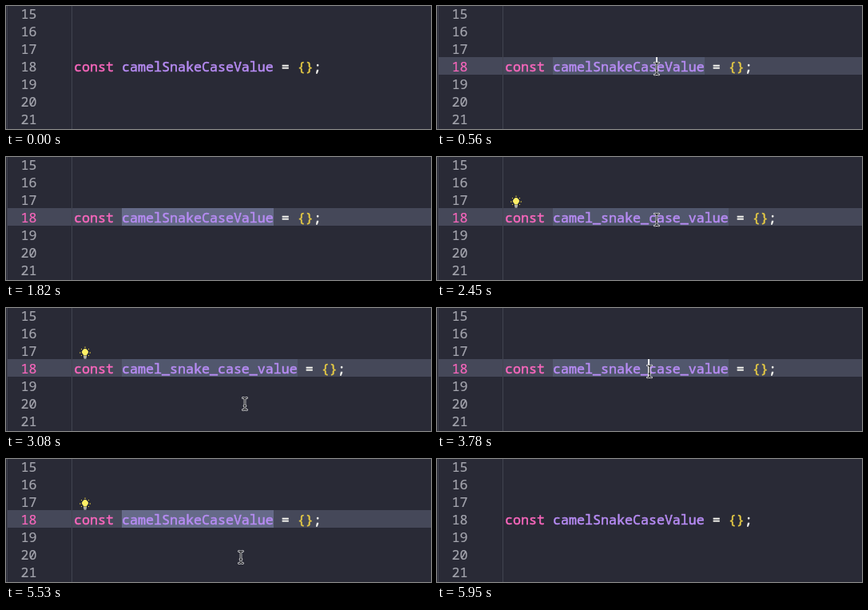
Animation, 532 px wide and 154 px high, one loop 7000 ms. Source, as an HTML page:

```html
<!DOCTYPE html>
<html lang="en">
<head>
<meta charset="utf-8">
<title>Change case</title>
<style>
  html, body { margin: 0; width: 100%; height: 100%; overflow: hidden; background: #292a36; }
  svg { display: block; width: 532px; height: 154px; }
  text { font: 16.667px "Noto Sans Mono", "DejaVu Sans Mono", monospace; white-space: pre; }
  .num, .key, .name, .op, .brace { fill: currentColor; stroke: currentColor; stroke-width: .5; }
  .num { color: #a5a6af; stroke-width: .2; }
  .num.active, .key { color: #f967bd; }
  .name { color: #b88cf5; }
  .op { color: #f8f8f2; }
  .brace { color: #e6cb45; }
</style>
</head>
<body>
<svg viewBox="0 0 532 154">
  <rect width="532" height="154" fill="#292a36"/>
  <rect id="line" x="2" y="64" width="530" height="22" fill="#454859"/>
  <rect id="word" x="145" y="64" height="22"/>
  <rect x="1" width="1" height="154" fill="#41434f"/>
  <rect x="82" width="1" height="154" fill="#41434f"/>
  <g id="nums"></g>
  <text x="85" y="82"><tspan class="key">const </tspan><tspan class="name" id="name"></tspan><tspan class="op"> = </tspan><tspan class="brace">{}</tspan><tspan class="op">;</tspan></text>
  <rect id="caret" y="64" width="2" height="22" fill="#f8f8f2"/>
  <g id="bulb" transform="translate(99 56)">
    <path d="M0-7.500v1.500M-5-5l1 1M5-5l-1 1M-7 0h1.500M7 0h-1.500M-5 4l1-1M5 4l-1-1" stroke="#f5d93f"/>
    <path d="M-2 3.500Q-2 2.500-2.700 1.800A3.800 3.800 0 1 1 2.700 1.800Q2 2.500 2 3.500Z" fill="#fff066"/>
    <path d="M-2 5h4M-1.500 6.800h3" stroke="#dcdccb" stroke-width="1.300"/>
  </g>
  <g id="mouse" fill="none" stroke-linecap="round">
    <path id="edge" stroke="#fff" stroke-width="2.6"/>
    <path id="core" stroke="#101116" stroke-width="1.2"/>
  </g>
</svg>
<script>
const LOOP = 7000, STEP = 70, CHAR = 10;
const $ = id => document.getElementById(id);
const show = (id, on) => $(id).setAttribute('visibility', on ? 'visible' : 'hidden');
const within = (t, a, b) => t >= a && t < b;

const beam = 'M-2.500-7.500Q0-7.500 0-6V6Q0 7.500-2.500 7.500M2.500-7.500Q0-7.500 0-6M0 6Q0 7.500 2.500 7.500M-1 2.500H1';
$('edge').setAttribute('d', beam);
$('core').setAttribute('d', beam);

$('nums').innerHTML = Array.from({ length: 7 }, (_, i) =>
  `<text class="num" id="n${15 + i}" x="18.5" y="${16 + 22 * i}">${15 + i}</text>`).join('');

// Pointer moves: start, end, hidden at, from, to
const moves = [
  [70, 350, 1820, [378, 129], [275, 78.5]],
  [2450, 2870, 3080, [275, 78.5], [299, 120]],
  [3080, 3500, 4690, [299, 120], [266, 79.5]],
  [5530, 5531, 5600, [294, 123], [294, 123]]
];

function pointer(t) {
  const move = moves.find(m => within(t, m[0], m[2]));
  if (!move) return null;
  const [start, end, , from, to] = move;
  const p = Math.min(1, (t - start) / (end - start));
  const e = p * p * (3 - 2 * p);
  return from.map((v, i) => v + (to[i] - v) * e);
}

function caretX(t, end) {
  if (within(t, 560, 840)) return 274;
  if (within(t, 3570, 3850)) return 264;
  if (within(t, 1890, 2450) || within(t, 3850, 4410)) return end - 1;
  return null;
}

function draw(time) {
  const t = Math.floor((time % LOOP) / STEP) * STEP;
  const name = within(t, 1890, 4760) ? 'camel_snake_case_value' : 'camelSnakeCaseValue';
  const width = name.length * CHAR;
  const focused = within(t, 560, 5950);
  const selected = within(t, 840, 2450) || within(t, 3850, 5950);

  $('name').textContent = name;
  $('word').setAttribute('width', width);
  $('word').setAttribute('fill', selected ? '#656a88' : '#51576d');
  $('n18').classList.toggle('active', focused);
  show('line', focused);
  show('word', focused);
  show('bulb', within(t, 2450, 3570) || within(t, 5530, 5950));

  const x = caretX(t, 145 + width);
  show('caret', x !== null);
  if (x !== null) $('caret').setAttribute('x', x);

  const pos = pointer(t);
  show('mouse', pos);
  if (pos) $('mouse').setAttribute('transform', `translate(${pos})`);
}

const origin = performance.now();
function tick() {
  draw(performance.now() - origin);
  requestAnimationFrame(tick);
}
tick();
</script>
</body>
</html>
```
